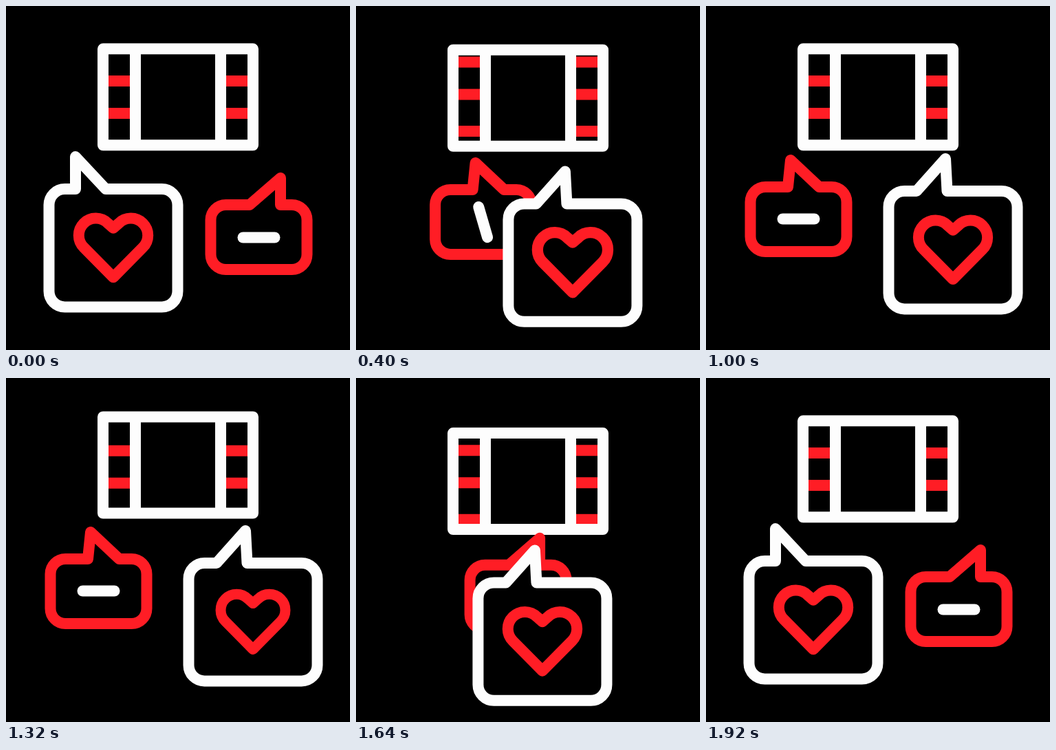
An HTML page that plays this animation: 500 px wide and 500 px high, repeating every 2000 ms.

```html
<!DOCTYPE html>
<html lang="en">
<head>
<meta charset="utf-8">
<title>Film and speech bubbles</title>
<style>
@property --p { syntax: "<number>"; inherits: true; initial-value: 0; }
@property --film { syntax: "<number>"; inherits: true; initial-value: 0; }
@property --bars { syntax: "<number>"; inherits: true; initial-value: 0; }
@property --turn { syntax: "<number>"; inherits: true; initial-value: 0; }
@property --beat { syntax: "<number>"; inherits: true; initial-value: 1; }

html, body { margin: 0; width: 100%; height: 100%; overflow: hidden; background: #000; }

svg {
  display: block; width: 100%; height: 100%;
  fill: none; stroke-width: 16; stroke-linejoin: round; stroke-linecap: round;
  animation: 2s cubic-bezier(.33, 0, .67, 1) infinite;
  animation-name: swap, film, bars, turn, beat;
}
.white { stroke: #fdfdfd; }
.red { stroke: #ff1d25; }
.solid { fill: #000; }

.film { transform: translateY(calc(var(--film) * 1px)); }
.bars { transform: translateY(calc(var(--bars) * 1px)); stroke-linecap: butt; }
.dash { transform: rotate(calc(var(--turn) * 1deg)); }
.heart { transform: scale(var(--beat)); }

/* Both bubbles share one progress value; the large one swings below. */
.small {
  transform: translate(
    calc(367.5px - 233px * var(--p)),
    calc(336px - 26px * var(--p) - 10px * var(--p) * (1 - var(--p))));
}
.large {
  transform: translate(
    calc(156px + 203px * var(--p)),
    calc(351.8px + 2.9px * var(--p) + 1px * var(--p) * (1 - var(--p)) * (18 + 342 * var(--p) - 283 * var(--p) * var(--p))));
}
.small-shape { animation: small-tail 2s cubic-bezier(.33, 0, .67, 1) infinite; }
.large-shape { animation: large-tail 2s cubic-bezier(.33, 0, .67, 1) infinite; }

@keyframes swap {
  0% { --p: 0; }
  2% { --p: 0; animation-timing-function: cubic-bezier(.62, 0, .42, 1); }
  30% { --p: 1; }
  68% { --p: 1; animation-timing-function: cubic-bezier(.62, 0, .46, 1); }
  96%, 100% { --p: 0; }
}
@keyframes film {
  0%, 2% { --film: 0; }
  12.5% { --film: 20; }
  26% { --film: -11.5; }
  40%, 58% { --film: 0; }
  74% { --film: -11.5; }
  82.5% { --film: 18; }
  96%, 100% { --film: 0; }
}
@keyframes bars {
  0%, 2% { --bars: 0; }
  12% { --bars: .6; }
  26% { --bars: 116.5; }
  40%, 60% { --bars: 100.5; }
  74% { --bars: 107; animation-timing-function: cubic-bezier(.4, 0, .67, 1); }
  96%, 100% { --bars: 0; }
}
@keyframes turn {
  0%, 6% { --turn: 0; }
  38%, 70% { --turn: 180; }
  96%, 100% { --turn: 0; }
}
@keyframes beat {
  0%, 2% { --beat: 1; }
  12% { --beat: 1.025; }
  26% { --beat: 1.012; }
  40%, 48% { --beat: 1; }
  70% { --beat: .929; }
  81%, 100% { --beat: 1; }
}
@keyframes small-tail {
  0%, 2%, 82%, 100% {
    d: path("M-48 -47L-13.5 -47L31.5 -86L31.5 -47L48 -47A22 22 0 0 1 70 -25L70 25A22 22 0 0 1 48 47L-48 47A22 22 0 0 1 -70 25L-70 -25A22 22 0 0 1 -48 -47Z");
  }
  14%, 74% {
    d: path("M-48 -47L-15.5 -47L-11.5 -86L30 -47L48 -47A22 22 0 0 1 70 -25L70 25A22 22 0 0 1 48 47L-48 47A22 22 0 0 1 -70 25L-70 -25A22 22 0 0 1 -48 -47Z");
  }
}
@keyframes large-tail {
  0%, 2%, 95%, 100% {
    d: path("M-70.5 -85.7L-55 -85.7L-55 -132.7L-11 -85.7L70.5 -85.7A23 23 0 0 1 93.5 -62.7L93.5 62.7A23 23 0 0 1 70.5 85.7L-70.5 85.7A23 23 0 0 1 -93.5 62.7L-93.5 -62.7A23 23 0 0 1 -70.5 -85.7Z");
  }
  14%, 84% {
    d: path("M-70.5 -85.7L-53 -85.7L-11 -132.7L-8.5 -85.7L70.5 -85.7A23 23 0 0 1 93.5 -62.7L93.5 62.7A23 23 0 0 1 70.5 85.7L-70.5 85.7A23 23 0 0 1 -93.5 62.7L-93.5 -62.7A23 23 0 0 1 -70.5 -85.7Z");
  }
}
</style>
</head>
<body>
<svg viewBox="0 0 500 500">
  <clipPath id="inside"><rect x="141" y="62" width="218" height="140"/></clipPath>

  <g class="film">
    <g clip-path="url(#inside)">
      <g class="bars red">
        <path id="pair" d="M141 109H188M312 109H359M141 156H188M312 156H359"/>
        <use href="#pair" y="-100.5"/>
      </g>
    </g>
    <path class="white" d="M141 62.3H359V202.3H141ZM188 62.3V202.3M312 62.3V202.3"/>
  </g>

  <g class="small">
    <path class="small-shape red solid"/>
    <path class="dash white" d="M-23 .5H23"/>
  </g>

  <g class="large">
    <path class="large-shape white solid"/>
    <path class="heart red" d="M0 -29L-7.8 -35.8A24.75 24.75 0 1 0 -42.8 -.8L0 42.5L42.8 -.8A24.75 24.75 0 1 0 7.8 -35.8Z"/>
  </g>
</svg>
</body>
</html>
```
